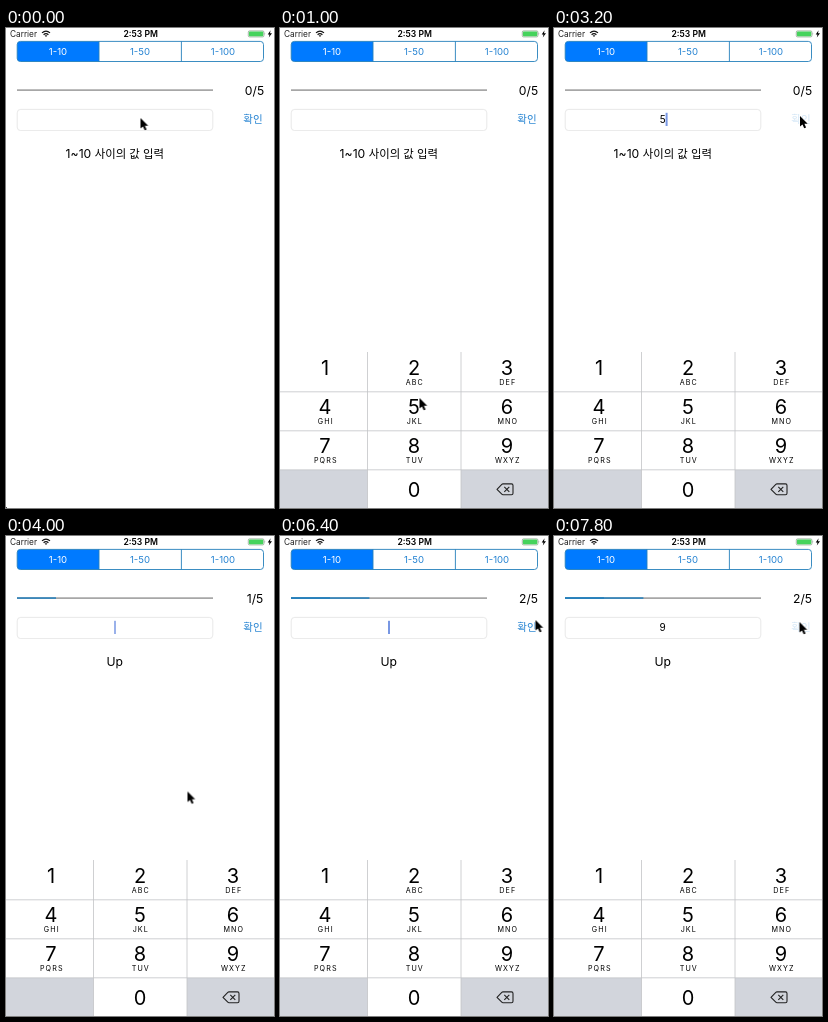
An HTML page that plays this animation: 268 by 480 pixels, repeating every 8 s.

```html
<!DOCTYPE html>
<html lang="ko">
<head>
<meta charset="utf-8">
<title>Up Down</title>
<style>
html, body { margin: 0; width: 100%; height: 100%; overflow: hidden; background: #fff; }
svg { display: block; width: 100vw; height: 100vh; }
text { font-family: Inter, "Noto Sans CJK KR", "Noto Sans CJK", sans-serif; text-anchor: middle; }
.blue { fill: #2583d2; }
.label { font-size: 12.2px; }
.segment { font-size: 9.6px; }
.digit { font-size: 20px; }
.letters { font-size: 7.2px; letter-spacing: 1.1px; }
.hangul { font-family: "Noto Sans CJK KR", "Noto Sans CJK", sans-serif; }

/* Every state changes on a 200 ms tick, which is 2.5% of the loop. */
.anim { animation: 8s step-end infinite; }
.dot { animation-name: dot; }
@keyframes dot { 0% { opacity: 1 } 2.5%, 100% { opacity: 0 } }

.keypad { animation-name: slide; }
@keyframes slide {
  0% { transform: translateY(156px) }
  5% { transform: translateY(76px) }
  7.5% { transform: translateY(8px) }
  10%, 100% { transform: none }
}

.press5 { animation-name: press5; }
.press8 { animation-name: press8; }
.press9 { animation-name: press9; }
@keyframes press5 { 0%, 35%, 100% { opacity: 0 } 32.5% { opacity: 1 } }
@keyframes press8 { 0%, 65%, 100% { opacity: 0 } 62.5% { opacity: 1 } }
@keyframes press9 { 0%, 92.5%, 100% { opacity: 0 } 87.5% { opacity: 1 } }

.typed5 { animation-name: typed5; }
.typed8 { animation-name: typed8; }
.typed9 { animation-name: typed9; }
@keyframes typed5 { 0%, 42.5%, 100% { opacity: 0 } 35% { opacity: 1 } }
@keyframes typed8 { 0%, 75%, 100% { opacity: 0 } 65% { opacity: 1 } }
@keyframes typed9 { 0% { opacity: 0 } 90%, 100% { opacity: 1 } }

.try0 { animation-name: try0; }
.try1 { animation-name: try1; }
.try2 { animation-name: try2; }
.hint { animation-name: hint; }
@keyframes try0 { 0% { opacity: 1 } 42.5%, 100% { opacity: 0 } }
@keyframes try1 { 0%, 75%, 100% { opacity: 0 } 42.5% { opacity: 1 } }
@keyframes try2 { 0% { opacity: 0 } 75%, 100% { opacity: 1 } }
@keyframes hint { 0% { opacity: 0 } 42.5%, 100% { opacity: 1 } }

.confirm { animation-name: confirm; }
@keyframes confirm {
  0%, 42.5%, 75% { opacity: 1 }
  40%, 72.5%, 97.5%, 100% { opacity: .2 }
}

.caret { animation-name: blink, shift; }
@keyframes blink {
  0%, 10%, 22.5%, 47.5%, 57.5%, 77.5%, 85%, 97.5%, 100% { opacity: 0 }
  5%, 15%, 27.5%, 52.5%, 62.5%, 80%, 90% { opacity: 1 }
  50% { opacity: .75 }
}
@keyframes shift {
  0%, 42.5%, 75% { transform: none }
  35%, 65%, 90%, 100% { transform: translateX(3.6px) }
}

.pointer { animation-name: point; }
@keyframes point {
  0% { transform: translate(134.5px, 90px) }
  7.5% { transform: translate(136px, 168px) }
  10% { transform: translate(138px, 306px) }
  12.5% { transform: translate(139.5px, 370px) }
  15% { transform: translate(140px, 373px) }
  25% { transform: translate(138px, 376px) }
  30% { transform: translate(136.5px, 377px) }
  35% { transform: translate(156px, 318px) }
  37.5% { transform: translate(222px, 160px) }
  40% { transform: translate(246px, 88px) }
  47.5% { transform: translate(235px, 122px) }
  50% { transform: translate(181.5px, 255.5px) }
  52.5% { transform: translate(152px, 388px) }
  55% { transform: translate(142px, 455px) }
  57.5% { transform: translate(147px, 428px) }
  60% { transform: translate(149.5px, 413.5px) }
  65% { transform: translate(160px, 365px) }
  67.5% { transform: translate(214px, 204px) }
  70% { transform: translate(246px, 88px) }
  77.5% { transform: translate(250px, 86px) }
  80% { transform: translate(255.5px, 84px) }
  82.5% { transform: translate(244px, 212px) }
  85% { transform: translate(230px, 382px) }
  87.5% { transform: translate(228px, 416px) }
  92.5% { transform: translate(236px, 282px) }
  95% { transform: translate(245px, 104px) }
  97.5%, 100% { transform: translate(245.5px, 86px) }
}
</style>
</head>
<body>
<svg viewBox="0 0 268 480">
  <!-- status bar -->
  <text x="17.5" y="9.2" font-size="8.3" fill="#222">Carrier</text>
  <g fill="none" stroke="#111" stroke-width="1.2">
    <path d="M36 4.9Q40 1.3 44 4.9M37.6 6.7Q40 4.5 42.4 6.7"/>
    <path d="M38.7 7.6Q40 6.7 41.3 7.6L40 9.1Z" fill="#111" stroke="none"/>
  </g>
  <text x="134.7" y="9.2" font-size="8.6" font-weight="600">2:53 PM</text>
  <rect x="242.3" y="2.9" width="15.6" height="6" rx="1.2" fill="none" stroke="#7d9a80" stroke-width=".7"/>
  <rect x="243" y="3.6" width="14.2" height="4.6" rx=".6" fill="#45d35c"/>
  <path d="M258.7 4.8q1.1 1.1 0 2.2Z" fill="#777"/>
  <path d="M264.6 2.3L261.7 6.4H263.5L262.8 9.5L266 5.2H264Z"/>

  <!-- range selector -->
  <path d="M93 13.4H14.5Q11.2 13.4 11.2 16.7V30.2Q11.2 33.5 14.5 33.5H93Z" fill="#007aff"/>
  <g fill="none" stroke="#2580bb" stroke-width=".9">
    <rect x="11.2" y="13.4" width="246.3" height="20.1" rx="3.2"/>
    <path d="M93 13.4V33.5M175.4 13.4V33.5"/>
  </g>
  <text class="segment" x="52" y="27" fill="#fff">1-10</text>
  <text class="segment blue" x="134" y="27">1-50</text>
  <text class="segment blue" x="217" y="27">1-100</text>

  <!-- attempts -->
  <rect x="11" y="61.4" width="196" height="1.4" fill="#929292"/>
  <rect class="anim hint" x="11" y="61.3" width="39" height="1.5" fill="#227fbd"/>
  <rect class="anim try2" x="11" y="61.3" width="78.4" height="1.5" fill="#227fbd"/>
  <g class="label">
    <text class="anim try0" x="248.5" y="66.6">0/5</text>
    <text class="anim try1" x="249" y="66.6">1/5</text>
    <text class="anim try2" x="248.5" y="66.6">2/5</text>
  </g>

  <!-- guess -->
  <rect x="11.2" y="81.4" width="195.6" height="21.2" rx="3.5" fill="#fff" stroke="#e2e2e2" stroke-width=".8"/>
  <g font-size="10">
    <text class="anim typed5" x="108.7" y="95.3">5</text>
    <text class="anim typed8" x="108.7" y="95.3">8</text>
    <text class="anim typed9" x="108.7" y="95.3">9</text>
  </g>
  <rect class="anim caret" x="108.3" y="84.8" width="1.4" height="13.2" fill="#3f6bd8"/>
  <text class="anim confirm blue hangul" x="247" y="95.4" font-size="10.5">확인</text>
  <text class="anim try0 label" x="108.8" y="129.8">1~10 <tspan class="hangul" font-size="11.4">사이의 값 입력</tspan></text>
  <text class="anim hint label" x="108.8" y="129.8">Up</text>
  <rect class="anim dot" y="479" width="1" height="1" fill="#444"/>

  <!-- keypad -->
  <g class="anim keypad">
    <rect y="324" width="268" height="156" fill="#fff"/>
    <g fill="#d2d5dc">
      <path d="M0 442H87.5V480H0ZM181 442H268V480H181Z"/>
      <rect class="anim press5" x="87.5" y="363.8" width="93.5" height="39"/>
      <rect class="anim press8" x="87.5" y="402.8" width="93.5" height="39"/>
      <rect class="anim press9" x="181" y="402.8" width="87" height="39"/>
    </g>
    <path d="M0 363.8H268M0 402.8H268M0 441.8H268M87.5 324V480M181 324V480" stroke="#c3c4c7" stroke-width=".8"/>
    <g id="keys"></g>
    <g fill="none" stroke="#222" stroke-width="1.1" stroke-linejoin="round">
      <path d="M217 461.3L221.8 456.4Q222.3 455.9 223 455.9H231.5Q233 455.9 233 457.4V465.2Q233 466.7 231.5 466.7H223Q222.3 466.7 221.8 466.2Z"/>
      <path d="M224.3 458.8L229.3 463.8M229.3 458.8L224.3 463.8"/>
    </g>
  </g>

  <path class="anim pointer" d="M0 0V10.6L2.5 8.4L4.2 12.2L6.1 11.4L4.4 7.7H7.7Z" stroke="#fff" stroke-width=".8" paint-order="stroke"/>
</svg>
<script>
const keys = document.getElementById('keys');
const columns = [45, 134, 227];
const letters = ['', 'ABC', 'DEF', 'GHI', 'JKL', 'MNO', 'PQRS', 'TUV', 'WXYZ'];

function addText(className, x, y, content) {
  const text = document.createElementNS(keys.namespaceURI, 'text');
  text.setAttribute('class', className);
  text.setAttribute('x', x);
  text.setAttribute('y', y);
  text.textContent = content;
  keys.append(text);
}

letters.forEach((group, i) => {
  const x = columns[i % 3];
  const y = 346.6 + 39 * Math.floor(i / 3);
  addText('digit', x, y, i + 1);
  if (group) addText('letters', x + 0.8, y + 10.6, group);
});
addText('digit', columns[1], 468.8, 0);
</script>
</body>
</html>
```
